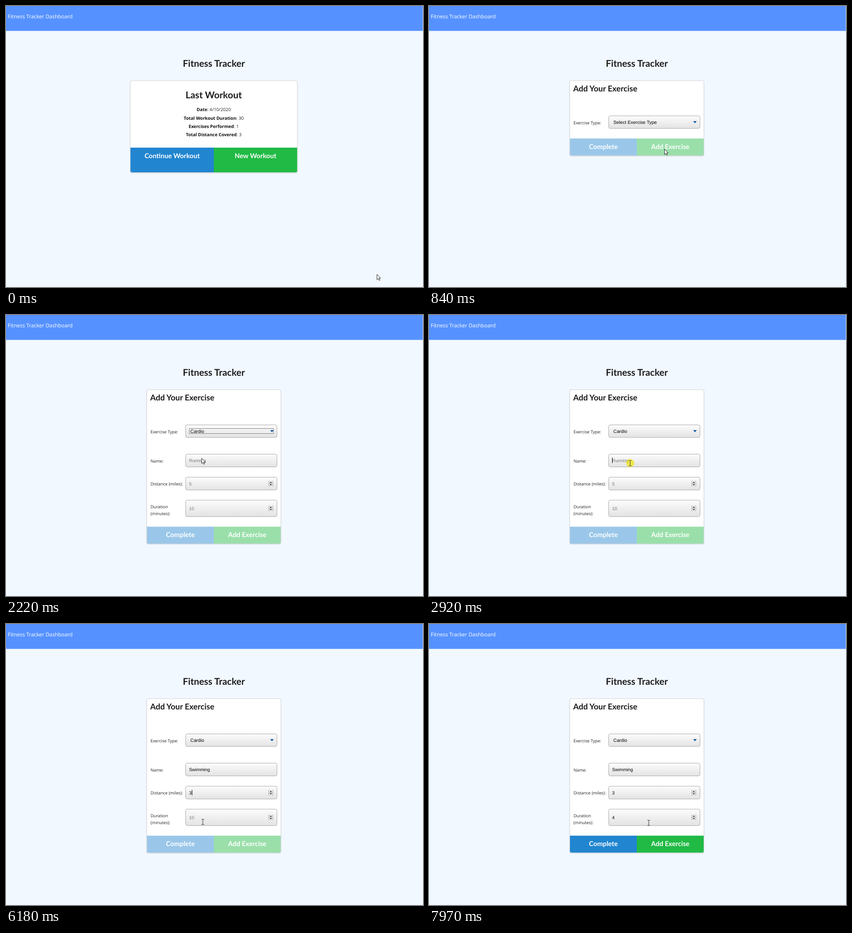
Animation of 911 by 615 pixels, one loop 8000 ms. Source, as an HTML page:

```html
<!DOCTYPE html>
<html lang="en">
<head>
<meta charset="utf-8">
<title>Fitness Tracker</title>
<style>
html, body { margin: 0; width: 100%; height: 100%; overflow: hidden; background: #f2f8ff; }
svg { display: block; width: 911px; height: 615px; }
text { white-space: pre; text-rendering: geometricPrecision; }
.lato { font-family: Lato, sans-serif; font-weight: 700; fill: #1b1c1d; }
.ui { font-family: "Open Sans", sans-serif; fill: #222; }
.field { font-family: "Liberation Sans", Arial, sans-serif; font-size: 10.2px; fill: #000; }
.input { font-size: 9.9px; }
.mid { text-anchor: middle; }
.white { fill: #fff; }
.card { filter: drop-shadow(0 1px 1.5px rgba(0, 0, 0, .26)); }
</style>
</head>
<body>
<svg id="stage" viewBox="0 0 911 615"></svg>
<script>
const LOOP = 8000, STEP = 77, HALO = 150, BLINK = 570, KEY_GAP = 75;
const OPEN = 1530, PICK = 2140, READY = 7340;
const CARD_X = 308, CARD_W = 292, FIELD_X = 392.5, FIELD_W = 199;

const text = (x, y, s, cls, px, extra = '') =>
  `<text x="${x}" y="${y}" class="${cls}" ${px ? `font-size="${px}"` : ''} ${extra}>${s}</text>`;
const rect = (x, y, w, h, fill, extra = '') =>
  `<rect x="${x}" y="${y}" width="${w}" height="${h}" fill="${fill}" ${extra}/>`;
const group = (id, body) => `<g id="${id}">${body}</g>`;

function card(x, w, h) {
  return rect(x, 164, w, h, '#fff', 'rx="3" class="card"') +
    rect(x - .5, 163.5, w + 1, h + 1, 'none', 'rx="3.5" stroke="#d4d6da"');
}

function buttons(x, y, w, h, left, right, textY) {
  const r = 3, mid = x + w / 2, end = x + w, base = y + h;
  const label = (share, s) => text(x + w * share, textY, s, 'lato mid white', 14.58);
  return `<path fill="#2185d0" d="M${x} ${y}H${mid}V${base}H${x + r}Q${x} ${base} ${x} ${base - r}Z"/>` +
    `<path fill="#21ba45" d="M${mid} ${y}H${end}V${base - r}Q${end} ${base} ${end - r} ${base}H${mid}Z"/>` +
    label(.25, left) + label(.75, right);
}

const box = (y, h) => rect(FIELD_X, y + .5, FIELD_W + .5, h - 1, 'url(#shade)', 'rx="3.5" stroke="#a9a9a9"');
const label = (y, s) => text(315.8, y, s, 'ui', 9.25);

function spinner(y) {
  return `<path d="M576 ${y - 5.5}h-2v11h2M581 ${y - 5.5}h2v11h-2M574 ${y}h9" fill="none" stroke="#aaa"/>` +
    `<path d="M576 ${y - 1.5}h5l-2.5-3zM576 ${y + 1.5}h5l-2.5 3z" fill="#333"/>`;
}

// Each burst is a time and the letters typed from then on.
const fields = [
  { id: 'name', y: 304, h: 29, ghost: 'Running', click: 2850,
    bursts: [[4010, 'S'], [4240, 'w'], [4470, 'imm'], [4790, 'ing']] },
  { id: 'distance', y: 354.5, h: 29, ghost: '5', click: 5640, bursts: [[5840, '3']], spin: true },
  { id: 'duration', y: 404.7, h: 37, ghost: '10', click: 6640, bursts: [[READY, '4']], spin: true }
];
for (const f of fields) {
  f.base = f.y + f.h / 2 + 3.8;
  f.keys = f.bursts.flatMap(([t, s]) => [...s].map((ch, i) => ({ t: t + i * KEY_GAP, ch })));
}

const inputs = fields.map(f =>
  box(f.y, f.h) + (f.spin ? spinner(f.y + f.h / 2) : '') +
  text(400, f.base, '', 'field input', 0, `id="${f.id}"`)).join('');

const facts = [['Date', '4/10/2020'], ['Total Workout Duration', 30],
  ['Exercises Performed', 1], ['Total Distance Covered', 3]].map(([name, value], i) =>
  text(453.8, 230.4 + i * 18.2, `<tspan font-weight="700" fill="#111">${name}</tspan>: ${value}`, 'ui mid', 9.75)).join('');

const options = ['Select Exercise Type', 'Resistance', 'Cardio'].map((s, i) =>
  text(397, 281.2 + i * 18.3, s, 'field', 0, `id="opt${i}"`)).join('');

document.getElementById('stage').innerHTML = `
<defs><linearGradient id="shade" x2="0" y2="1">
  <stop stop-color="#fcfcfc"/><stop offset="1" stop-color="#e3e3e3"/>
</linearGradient></defs>` +
  rect(0, 0, 911, 615, '#f2f8ff') +
  rect(0, 0, 910.5, 54.5, '#5692ff') +
  text(4, 27, 'Fitness Tracker Dashboard', 'ui white', 11.5) +
  text(454, 132.7, 'Fitness Tracker', 'lato mid', 20.4) +
  group('home',
    card(272, 364, 200) + text(453.8, 201.5, 'Last Workout', 'lato mid', 20.4) + facts +
    buttons(272, 310, 364, 54, 'Continue Workout', 'New Workout', 333)) +
  group('form',
    group('short', card(CARD_X, CARD_W, 163)) +
    group('tall', card(CARD_X, CARD_W, 336) +
      label(322.8, 'Name:') + label(373, 'Distance (miles):') +
      label(423.3, 'Duration') + label(437.7, '(minutes):') + inputs +
      group('hint', rect(FIELD_X, 332.5, FIELD_W, 15.5, '#fff', 'stroke="#aaa"') +
        text(396, 344, 'Swimming', 'ui', 8.9, 'style="fill:#000"'))) +
    text(315, 187.3, 'Add Your Exercise', 'lato', 17.6) +
    label(258.5, 'Exercise Type:') + box(240, 28.5) +
    text(402.8, 257.7, '', 'field', 0, 'id="kind"') +
    '<path d="M577 252h8l-4 4.5z" fill="#0b57a4"/>' +
    rect(400.5, 248.5, 184, 11, 'none', 'id="ring" stroke="#777" stroke-width=".9"') +
    group('actions', buttons(CARD_X, 0, CARD_W, 37, 'Complete', 'Add Exercise', 23.2)) +
    group('menu', rect(FIELD_X, 267.5, FIELD_W, 56, '#fff', 'stroke="#8a8a8a"') +
      rect(393, 286.5, 198, 18.5, '#0078d7', 'id="mark"') + options) +
    rect(0, 0, 1, 12, '#000', 'id="caret"')) +
  group('mouse',
    '<circle id="halo" r="9" fill="#f0e600" fill-opacity=".65"/>' +
    '<path id="arrow" d="M.5 .5V12L3.2 9.5L5.2 13.6L7 12.8L5.1 8.7H8.5Z" fill="#fff" stroke="#111" stroke-width=".9"/>' +
    '<path id="beam" d="M-3 -5.5h2.2l.8 .6l.8 -.6h2.2M0 -5v10.5M-3 6h2.2l.8 -.6l.8 .6h2.2" fill="none" stroke="#333"/>');

const el = {};
document.querySelectorAll('[id]').forEach(e => el[e.id] = e);

// Mouse moves: start, end, x, y. The mouse rests between them.
const home = [810, 587];
const moves = [
  [70, 620, 514, 313], [920, 1230, 350, 208], [1230, 1400, 428, 254], [1605, 1840, 427, 313],
  [2320, 2390, 430, 276], [2390, 2620, 439.5, 324], [3000, 3080, 438.5, 325],
  [5190, 5560, 450, 371], [5870, 6030, 447, 388], [6030, 6180, 430, 433],
  [6300, 6410, 429.5, 427], [7490, 7740, 500, 454], [7740, 7970, 480, 435]
];
const clicks = [690, 1460, ...fields.map(f => f.click)];

const during = (t, a, b) => t >= a && t < b;
const show = (e, on) => e.setAttribute('visibility', on ? 'inherit' : 'hidden');
const place = (e, x, y) => e.setAttribute('transform', `translate(${x} ${y})`);
const ease = k => k < .5 ? 2 * k * k : 1 - 2 * (1 - k) ** 2;

function pointer(t) {
  let [x, y] = home;
  for (const [a, b, toX, toY] of moves) {
    if (t < a) break;
    const steps = Math.floor((t - a + 4) / STEP);
    const k = t >= b ? 1 : ease(Math.min(1, steps * STEP / (b - a)));
    x += (toX - x) * k;
    y += (toY - y) * k;
  }
  return [x, y];
}

function drawFields(t) {
  let focus = null;
  for (const f of fields) {
    const typed = f.keys.filter(k => t >= k.t);
    const node = el[f.id];
    node.textContent = typed.map(k => k.ch).join('') || f.ghost;
    node.style.fill = typed.length ? '#000' : '#777';
    if (t >= f.click) focus = { f, node, typed };
  }
  if (!focus) return show(el.caret, false);
  const { f, node, typed } = focus;
  const last = typed.length ? typed[typed.length - 1].t : f.click;
  const width = typed.length ? node.getComputedTextLength() : 0;
  place(el.caret, Math.round(400 + width), Math.round(f.base - 10.3));
  show(el.caret, Math.floor((t - last) / BLINK) % 2 === 0);
}

function draw(t) {
  const tall = t >= PICK, formOn = t >= 760;
  show(el.home, !formOn);
  show(el.form, formOn);
  show(el.short, !tall);
  show(el.tall, tall);
  show(el.hint, during(t, 4090, fields[1].click));
  show(el.ring, during(t, 1460, fields[0].click));
  el.kind.textContent = tall ? 'Cardio' : 'Select Exercise Type';

  const active = t < 1760 ? 0 : t < 1840 ? 1 : 2;
  show(el.menu, during(t, OPEN, PICK));
  show(el.mark, active && during(t, OPEN, PICK));
  el.mark.setAttribute('y', 268.2 + active * 18.3);
  el.opt0.style.fill = '#6d6d6d';
  el.opt1.style.fill = active === 1 ? '#fff' : '#000';
  el.opt2.style.fill = active === 2 ? '#fff' : '#000';

  drawFields(t);

  place(el.actions, 0, tall ? 463.3 : 290);
  const ready = Math.max(0, Math.min(1, (t - READY) / 150));
  el.actions.setAttribute('opacity', .45 + .55 * ready);

  const [x, y] = pointer(t);
  const beam = t >= moves[4][0] && fields.some(f => during(y, f.y, f.y + f.h));
  place(el.mouse, x, y);
  show(el.arrow, !beam);
  show(el.beam, beam);
  show(el.halo, clicks.some(c => during(t, c, c + HALO)));
}

const start = performance.now();
function tick() {
  draw((performance.now() - start) % LOOP);
  requestAnimationFrame(tick);
}
draw(0);
tick();
</script>
</body>
</html>
```
